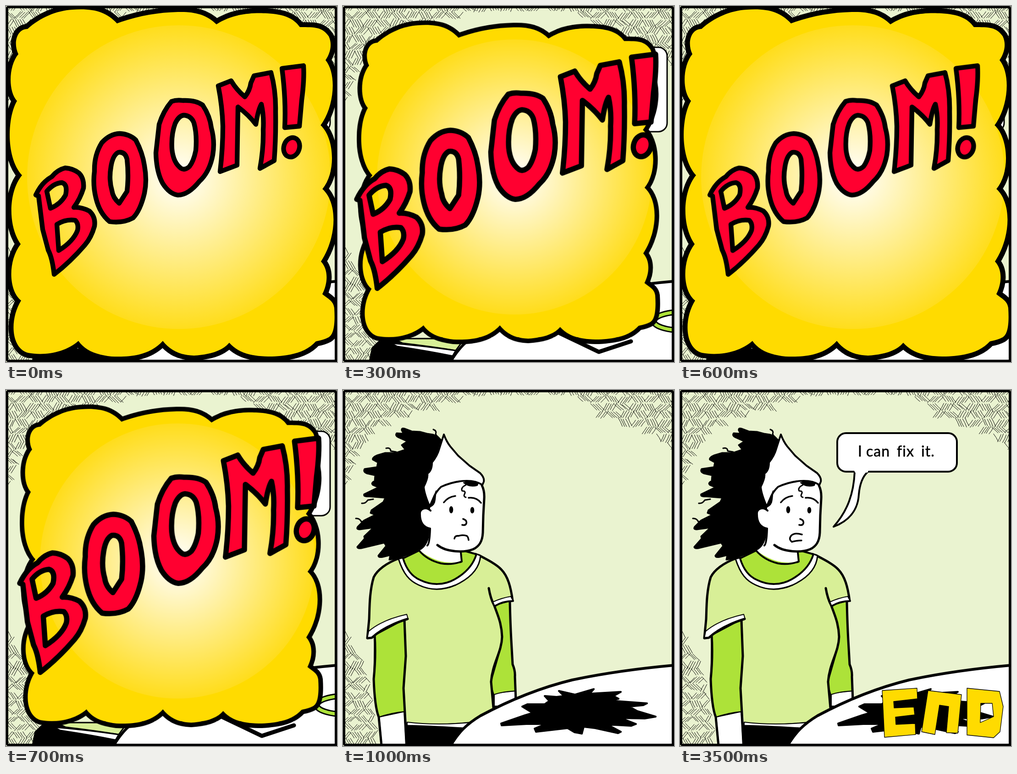
Write an HTML page that moves like this. It is 722x776 px and loops after 3.6 s.

```html
<!DOCTYPE html>
<html lang="en">
<head>
<meta charset="utf-8">
<title>Boom</title>
<style>
html, body { margin: 0; width: 100%; height: 100%; overflow: hidden; background: #000; }
svg { display: block; width: 100%; height: 100%; }
.ink { stroke: #000; stroke-linecap: round; stroke-linejoin: round; }
.line { fill: none; }
.w { fill: #fff; }
.shirt { fill: #d8ef97; }
.green { fill: #ade239; }

/* scenes: hard cuts inside a 3.6 s loop */
.blast, .after, .calm, .talk, .end { animation: 3.6s step-end infinite; }
.blast { animation-name: blast; }
.after { animation-name: after; }
.calm { animation-name: calm; }
.talk { animation-name: talk; }
.end { animation-name: end; }
@keyframes blast { 0% { visibility: visible } 27.7778%, 100% { visibility: hidden } }
@keyframes after { 0% { visibility: hidden } 27.7778%, 100% { visibility: visible } }
@keyframes calm { 0% { visibility: hidden } 27.7778% { visibility: visible } 69.4444%, 100% { visibility: hidden } }
@keyframes talk { 0% { visibility: hidden } 69.4444%, 100% { visibility: visible } }
@keyframes end { 0% { visibility: hidden } 97.2222%, 100% { visibility: visible } }

/* cloud shrinks while the word grows, and back */
.cloud, .word { transform-origin: 0 0; animation: .2s step-end infinite; }
.cloud { animation-name: shrink; }
.word { animation-name: grow; }
@keyframes shrink { 0% { transform: none } 50%, 100% { transform: translate(32.4px, 34.7px) scale(.906) } }
@keyframes grow { 0% { transform: none } 50%, 100% { transform: translate(-42.5px, -41px) scale(1.116, 1.122) } }

text { font: 32px Lato, "Open Sans", sans-serif; letter-spacing: 1px; stroke: #000; stroke-width: .5px; stroke-linejoin: round; }
</style>
</head>
<body>
<svg viewBox="0 0 722 776" preserveAspectRatio="none">
  <defs>
    <radialGradient id="glow">
      <stop offset="0" stop-color="#fff"/>
      <stop offset="1" stop-color="#ffdd1c"/>
    </radialGradient>
    <path id="puff" d="M47 50C75 25 110 10 145 8C190 5 218 12 242 38C285 22 330 14 375 13C410 12 437 18 459 40C495 16 540 14 570 16
      C605 18 627 26 641 46C675 46 690 46 704 66C713 85 706 105 697 118C723 150 715 222 686 260C715 285 722 360 690 399C725 430 721 505 687 557
      C704 575 702 605 690 628C700 637 714 642 716 658C718 690 716 715 704 722Q693 728 676 731C655 754 625 762 580 764C535 764 508 757 487 734
      C470 754 440 760 410 762C378 761 358 750 342 730C315 760 275 766 230 764C195 760 172 750 158 730C130 755 85 763 48 756
      C10 745 8 682 33 642C5 620 4 555 32 519C4 480 5 405 35 369C-1 330 3 242 24 207C4 185 6 130 27 105C15 80 24 50 47 50Z"/>
    <clipPath id="inside"><use href="#puff"/></clipPath>
  </defs>

  <rect width="722" height="776" fill="#eaf3d0"/>
  <path id="hatch" class="ink line" stroke-width="1"/>

  <!-- what peeks out behind the blast -->
  <g class="blast ink" stroke-width="3">
    <rect class="w" x="480" y="90" width="227" height="184" rx="19"/>
    <path d="M58 774L64 745L82 728H255L236 774Z"/>
    <path class="shirt" d="M110 725H265L246 751Q190 742 130 735Z"/>
    <path class="w" d="M105 735Q170 740 246 751L239 763Q185 752 118 742Z"/>
  </g>

  <!-- the girl -->
  <g class="after ink" stroke-width="4">
    <path stroke-width="3" d="M215 110L206 101L196 97L183 95L168 91L150 90L134 84Q127 82 128 88L132 95L117 94Q113 99 120 103L140 112L128 120
      L136 130L115 137L92 137L75 142Q63 147 65 152L76 158L74 168L47 172Q43 178 52 182L70 186L69 198Q60 203 65 207L77 212L46 227Q44 233 54 232
      L92 235L88 244L62 262L60 268L70 272L46 284L32 298Q28 304 37 304L66 300L46 319L47 324L31 342Q31 346 40 345L90 333L94 340L77 361Q77 366 87 364
      L103 360L101 370L118 367L166 350L200 330V240Z"/>
    <path class="line" stroke-width="3" d="M197 86Q205 89 202 96L207 104M94 127Q104 125 104 133L116 135M41 247Q49 248 54 240L66 238M28 280Q36 279 40 287L48 286"/>

    <!-- trousers and hands -->
    <path d="M138 728L284 724L236 775H138Z"/>
    <path class="w" d="M329 660L376 655L377 690H329Z"/>
    <path class="w" d="M78 712L84 775H138L134 700Z"/>
    <path class="green" d="M330 470L364 460Q365 510 367 545L370 598Q376 612 375 625L376 656Q350 657 329 664L322 640L345 560Z" stroke-width="2"/>
    <path class="line" d="M364 462Q365 510 367 545L370 598Q376 612 375 625L377 676" stroke-width="5"/>

    <!-- shirt -->
    <path class="shirt" stroke="none" style="stroke:none" d="M122 367C95 377 75 392 67 408C57 440 58 480 57 527L135 496L137 560L133 650L140 726Q210 731 290 722L329 692L323 640
      C325 600 347 575 347 535C346 505 334 485 328 466L368 453C364 415 350 395 335 383L296 362Z"/>
    <path class="w" stroke-width="2" d="M140 724Q205 732 285 724L268 737Q190 732 140 731Z"/>
    <path class="line" stroke-width="5" d="M122 367C95 377 75 392 67 408C57 440 58 480 57 500L53 541M296 360C315 370 335 380 345 391C360 406 366 430 370 459
      M318 432C321 450 324 459 330 470C337 490 346 508 347 538C346 572 326 595 323 636L328 692"/>
    <path class="w" stroke-width="2" d="M327 462Q347 453 366 450L371 460Q348 461 331 471Z"/>
    <path class="line" d="M331 471Q349 460 371 460"/>
    <path class="green" stroke-width="2" d="M69 535L135 500L137 560L133 650L134 701Q108 703 78 713L72 690L67 640Z"/>
    <path class="line" stroke-width="5" d="M69 534Q72 580 67 630Q69 690 78 713L84 775M134 502L137 580L132 650L139 774"/>
    <path class="w" stroke-width="2" d="M56 526Q85 501 139 489L142 499Q95 511 62 539L53 541Z"/>
    <path class="line" stroke-width="5" d="M54 541L63 540Q90 515 141 499"/>

    <!-- collar -->
    <path class="w" stroke-width="3" d="M121 368C132 402 145 416 165 425C190 437 218 437 246 425C280 409 298 388 300 361L290 357H165Z"/>
    <path class="green" stroke-width="4" d="M131 367C138 390 149 406 168 414C192 426 220 426 243 413C270 398 285 378 291 358L262 350L166 350Z"/>

    <!-- face -->
    <path class="w" style="stroke:none" d="M190 232L216 204L290 196L303 208Q309 220 308 240L304 315Q299 340 284 347L258 353V374Q212 384 167 350Q188 340 190 303Q164 290 168 268Q173 253 190 260Z"/>
    <path class="line" d="M190 303Q189 335 184 339M166 350Q184 371 214 378Q236 382 259 374L257 354M191 263C182 254 170 258 168 267C167 287 174 299 190 302"/>
    <path class="line" stroke-width="5" d="M303 208Q309 220 308 237L306 273L305 311C304 333 295 342 284 347C265 355 226 354 206 338"/>
    <path class="w" d="M220 97Q226 113 234 123L251 143L276 165L299 181Q309 191 307 200L304 207C285 194 250 195 214 211Q202 222 196 238L189 254
      Q177 226 176 211Q186 191 184 182Q194 176 194 158Q206 143 210 128Z"/>
    <path stroke-width="2" d="M203 220L201 239Q200 251 190 255L196 238ZM263 202Q276 213 293 208L295 202Q280 197 263 202Z"/>
    <path class="line" stroke-width="3" d="M268 207Q256 213 260 220Q269 220 265 227Q262 232 268 234"/>
    <path class="line" stroke-width="3.5" d="M220 245Q229 233 245 231M274 235Q291 233 301 246M262 281Q271 284 269 291Q267 296 260 294"/>
    <g style="stroke:none"><ellipse cx="236" cy="261" rx="4.3" ry="7.8"/><ellipse cx="282" cy="262" rx="4.3" ry="7"/></g>
  </g>
  <path class="calm ink line" stroke-width="3.5" d="M243 324Q244 317 252 318Q262 315 270 318Q273 320 274 327"/>
  <path class="talk ink line" stroke-width="3.5" d="M266 315Q250 310 243 317Q236 325 244 331Q255 328 265 328"/>

  <path class="w ink" stroke-width="6" d="M235 775C251 747 270 728 300 710C360 678 430 649 500 632Q600 611 722 600V780Z"/>

  <path class="after ink" stroke-width="4" d="M345 727L397 709L414 704L391 690L402 685L440 685L450 678L440 667L466 669L482 667L471 656L506 664L547 652L538 662
    L606 658L590 667L601 673L582 677L663 683L655 687L624 690L642 700L682 712L658 716L606 715L639 728L629 732L576 729L606 745L600 748
    L550 737L525 734L521 749L505 746L490 737L421 745L418 738L442 728L400 728L346 731Z"/>

  <!-- speech -->
  <g class="talk">
    <g class="w ink" stroke-width="4">
      <rect x="343" y="94" width="261" height="84" rx="19"/>
      <path d="M381 178C379 225 366 263 335 298C367 286 388 263 390 228Q393 193 410 178"/>
    </g>
    <path class="w" d="M379 174H412L409 180H382Z"/>
    <text y="145"><tspan x="388">I</tspan> <tspan x="406">can</tspan> <tspan x="473">fix</tspan> <tspan x="526">it.</tspan></text>
  </g>

  <path class="end ink" fill="#ffdb00" fill-rule="evenodd" stroke-width="1.3" d="M441 655L517 650L518 673L466 679L467 693L510 691L512 708L470 713L471 729L513 727L514 751L446 757Z
    M541 655L614 664L606 748L581 747L586 690L566 687L556 751L527 745Z
    M626 650L697 657L705 690L698 745L684 758L626 752ZM656 683L681 683L684 712L655 725Z"/>

  <!-- the blast -->
  <g class="blast ink">
    <path class="w" stroke-width="9" d="M468 711L558 754L628 731"/>
    <g class="line">
      <ellipse cx="740" cy="687" rx="62" ry="20" stroke-width="13"/>
      <ellipse cx="740" cy="687" rx="62" ry="20" style="stroke:#ade239" stroke-width="7"/>
    </g>
    <g class="cloud">
      <use href="#puff" fill="#ffdb00" stroke-width="22" paint-order="stroke"/>
      <circle cx="377" cy="373" r="331" fill="url(#glow)" style="stroke:none" clip-path="url(#inside)"/>
    </g>
    <g class="word" fill="#ff0030" fill-rule="evenodd" stroke-width="10.3">
      <path d="M65 412Q78 384 100 372Q112 357 129 353Q146 354 159 364Q171 376 169 397Q162 420 148 439Q165 438 182 447Q196 460 193 480
        Q186 505 172 521Q140 558 105 585Q101 549 92 532L80 487L71 414Z
        M89 404Q104 386 122 385Q135 389 130 412Q119 432 97 441Z
        M111 476Q130 464 151 467Q159 475 156 489Q147 513 115 533Q113 505 111 476Z"/>
      <path d="M248 278Q269 279 283 292Q298 320 302 348Q308 380 302 408Q293 446 277 462Q255 474 226 470Q204 452 196 418Q189 390 193 360
        Q192 325 209 298Q226 279 248 278Z
        M245 319Q260 317 264 334Q268 370 264 404L247 430Q233 418 231 402Q224 378 229 350Q233 325 245 319Z"/>
      <path d="M386 206Q414 205 429 216Q445 240 448 266Q456 295 451 325Q444 362 422 382Q397 413 374 412Q356 409 342 387Q328 362 327 320
        Q331 285 334 258Q343 229 361 208Q372 204 386 206Z
        M388 238Q404 239 410 255Q417 280 414 315Q409 339 400 350Q390 359 382 354Q365 342 362 312Q360 280 369 256Q377 239 388 238Z"/>
      <path d="M463 174L491 163Q503 183 521 198Q532 184 534 168L541 152L578 145Q589 185 588 230Q589 285 585 337L554 354Q562 310 561 270Q563 240 557 214
        Q550 226 545 258Q530 238 506 220Q505 290 504 347L467 361Q473 310 473 262Q472 220 463 174Z"/>
      <path d="M602 136L649 130Q651 160 645 205L640 262L608 265Q611 205 602 136Z"/>
      <ellipse cx="623" cy="308" rx="17" ry="21.5" transform="rotate(18 623 308)"/>
    </g>
  </g>

  <rect x="2.5" y="2.5" width="717" height="771" rx="2" fill="none" stroke="#000" stroke-width="5"/>
</svg>
<script>
// Pen hatching: rows of slanted stroke bundles that fade out away from the corners.
let seed = 11;
const rnd = () => (seed = seed * 16807 % 2147483647) / 2147483647;

const limit = (pts, v) => {
  const i = pts.findIndex(p => p[0] >= v);
  if (i < 1) return pts[i < 0 ? pts.length - 1 : 0][1];
  const [a, b] = pts[i - 1], [c, d] = pts[i];
  return b + (d - b) * (v - a) / (c - a);
};
const topEdge = [[0, 215], [10, 200], [25, 160], [45, 112], [75, 80], [110, 70], [160, 50], [245, 30], [270, 10], [380, 5],
  [470, 5], [515, 20], [545, 40], [570, 70], [640, 76], [670, 100], [700, 110], [722, 138]];
const leftEdge = [[515, 0], [530, 10], [560, 26], [600, 46], [630, 55], [680, 62], [776, 76]];
const shaded = (x, y) => x > 4 && (y < 300 ? y < limit(topEdge, x) : x < limit(leftEdge, y));

let d = '';
const bundle = (cx, cy, angle) => {
  const c = Math.cos(angle), s = Math.sin(angle);
  for (let k = 0; k < 5; k++) {
    const x = cx + k * 5.4 + rnd(), y = cy + rnd() * 3;
    const len = 7.5 + rnd() * 3, bend = rnd() * 3 - 1.5;
    if (!shaded(x, y)) continue;
    const at = (t, o) => (x + c * t - s * o).toFixed(1) + ' ' + (y + s * t + c * o).toFixed(1);
    d += 'M' + at(-len, 0) + 'Q' + at(0, bend) + ' ' + at(len, 0);
  }
};
for (let row = 0; row < 46; row++)
  for (let col = 0; col < 26; col++) {
    const side = (row + col) % 2 ? 1 : -1;
    bundle(col * 29 - row % 3 * 5, row * 17 + rnd() * 3, side * (.7 + rnd() * .45));
  }
document.getElementById('hatch').setAttribute('d', d);
</script>
</body>
</html>
```
